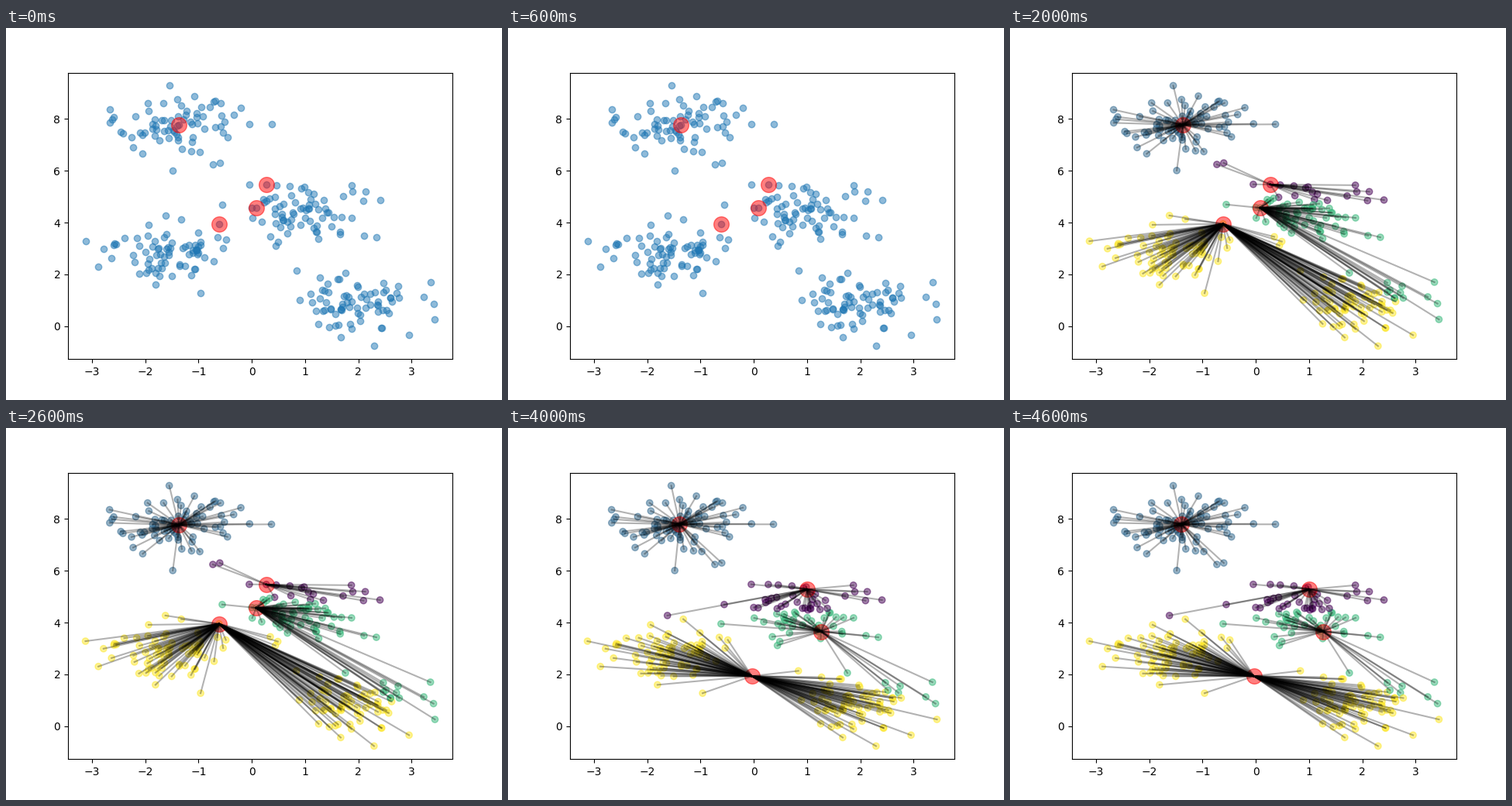
Write a matplotlib script that moves like this. It is 640 by 480 pixels and loops after 5000 ms.

```python
import numpy as np
import matplotlib.pyplot as plt
from matplotlib.animation import FuncAnimation
from matplotlib.collections import LineCollection

K = 4


def make_blobs(n, spread, seed=0):
    """Gaussian blobs around K random centres, in shuffled order."""
    rng = np.random.RandomState(seed)
    hubs = rng.uniform(-10, 10, (K, 2))
    pts = np.concatenate([rng.normal(hub, spread, (n // K, 2)) for hub in hubs])
    order = np.arange(n)
    rng.shuffle(order)
    return pts[order], hubs


def nearest(a, b):
    """Index of the closest row of b for each row of a."""
    return np.linalg.norm(a[:, None] - b[None], axis=2).argmin(axis=1)


points, hubs = make_blobs(300, 0.6)

# k-means steps: each state is (labels, centres)
start = points[nearest(np.array([(0.28, 5.47), (-1.37, 7.78),
                                 (0.08, 4.57), (-0.61, 3.94)]), points)]
guess = nearest(points, hubs[[0, 3, 1, 2]])
first = nearest(points, start)
moved = np.array([points[first == k].mean(axis=0) for k in range(K)])
second = nearest(points, moved)
states = [(None, start), (guess, start), (first, start),
          (first, moved), (second, moved)]

fig, ax = plt.subplots(figsize=(6.4, 4.8), dpi=100)
dots = ax.scatter(*points.T, color="C0", alpha=0.5)
marks = ax.scatter(*start.T, color="red", s=200, alpha=0.5)
links = LineCollection([], colors="black", linewidths=1.5, alpha=0.3,
                       capstyle="projecting", zorder=2)
ax.add_collection(links, autolim=False)


def update(i):
    labels, centres = states[i]
    marks.set_offsets(centres)
    if labels is None:
        dots.set_color("C0")
        links.set_segments([])
    else:
        dots.set_color(plt.cm.viridis(labels / (K - 1)))
        links.set_segments(np.stack([points, centres[labels]], axis=1))
    return dots, marks, links


anim = FuncAnimation(fig, update, frames=len(states), interval=1000,
                     repeat=True, repeat_delay=0)
plt.show()
```
